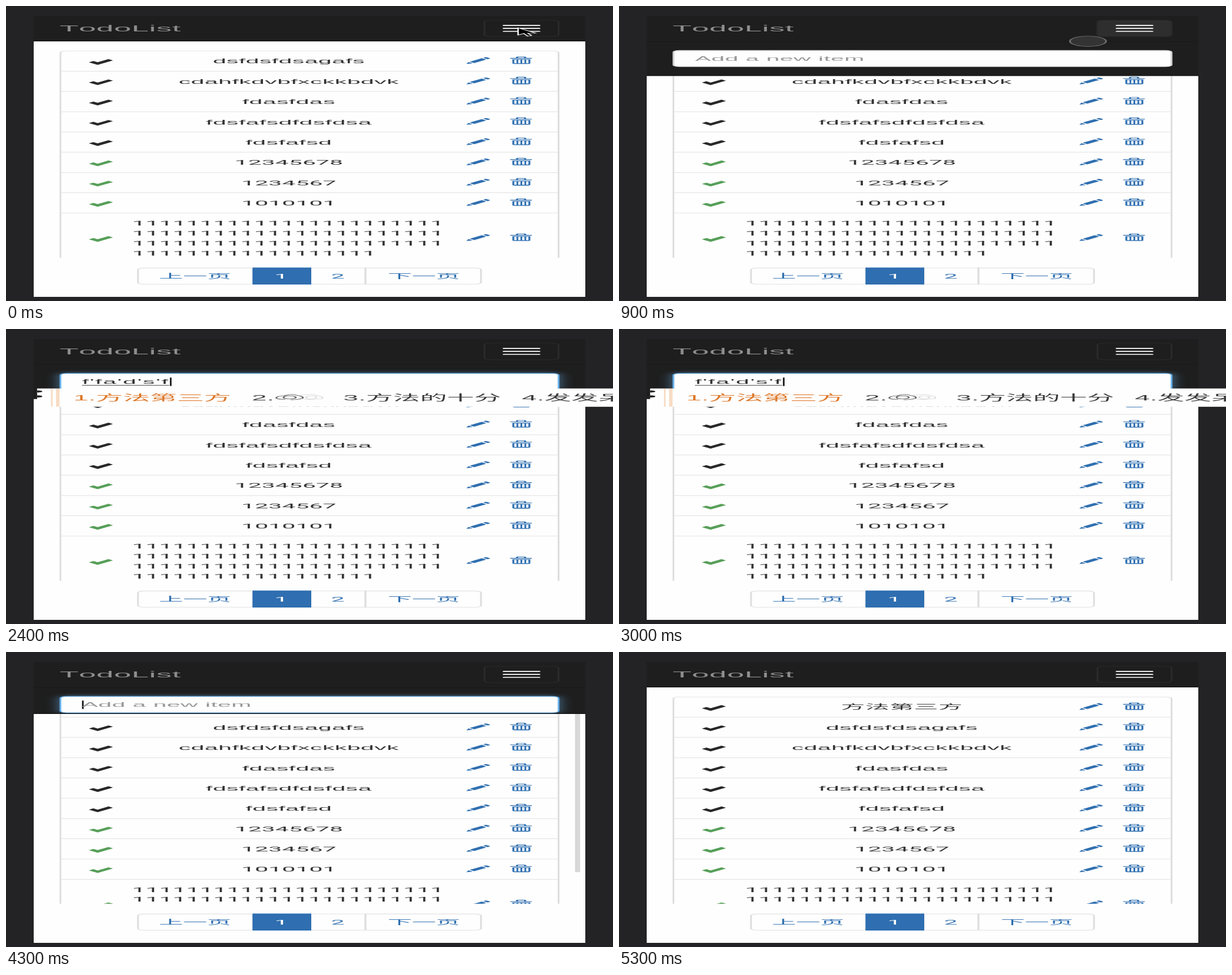
These frames come from a looping animation (1030 by 500 pixels, 5400 ms). An HTML page:

```html
<!DOCTYPE html>
<html lang="zh-CN">
<head>
<meta charset="utf-8">
<title>Todo list</title>
<style>
html, body { margin: 0; width: 100%; height: 100%; overflow: hidden; background: #232224; }
* { box-sizing: border-box; }
#stage { position: fixed; inset: 0; overflow: hidden; contain: strict; }
/* A 320 x 568 phone screen, shown wide and flat */
#phone {
  position: absolute; left: 0; top: 0; width: 320px; height: 568px;
  transform-origin: 0 0; transform: translate(47px, 17px) scale(2.925, .838);
  background: #fefefe; color: #333;
  font: 14px/20px "Liberation Sans", Arial, "Noto Sans CJK SC", "Noto Sans CJK", sans-serif;
  font-kerning: none;
}
#phone div, #phone svg { position: absolute; }
#clip { left: 0; top: 0; width: 320px; height: 489px; overflow: hidden; }
#list { left: 15px; top: 70px; width: 290px; border: 1px solid #ddd; border-radius: 4px; }
#list .row { position: relative; border-top: 1px solid #ddd; }
#list .row.first { border-top: 0; }
.row p {
  margin: 0 0 0 41px; width: 182px; padding: 10px 0;
  text-align: center; word-break: break-all; letter-spacing: .01em;
}
.row.done p, #pages { font-family: Roboto, "Noto Sans CJK SC", "Noto Sans CJK", sans-serif; letter-spacing: 0; }
.row p.long { text-align: left; }
.row svg { top: 50%; overflow: visible; }
.ok { left: 15.6px; margin-top: -5.5px; fill: #282828; }
.done .ok { fill: #579f59; }
.pen { left: 234.9px; margin-top: -8.5px; fill: #2f6fb0; }
.bin { left: 260px; margin-top: -9px; fill: #2f6fb0; }
#bar { left: 314px; top: 2px; width: 2.9px; height: 423px; background: #d8d8d8; }
#pages { left: 0; top: 509px; width: 320px; display: flex; justify-content: center; }
#pages span {
  position: relative; border: 1px solid #ddd; margin-left: -1px; padding: 6px 12px; height: 34px;
  color: #2f6fb0; background: #fefefe;
}
#pages span:first-child { border-radius: 4px 0 0 4px; margin-left: 0; }
#pages span:last-child { border-radius: 0 4px 4px 0; }
#pages .on { z-index: 1; background: #2f6eb0; border-color: #2f6eb0; color: #fff; }
#nav {
  left: 0; top: 0; width: 320px; overflow: hidden;
  background: #1e1e1e; border-bottom: 1px solid #080808;
}
#brand { left: 15px; top: 15px; font-size: 18px; color: #8e8e8e; letter-spacing: .01em; }
#toggle { left: 261px; top: 8px; width: 44px; height: 34px; border: 1px solid #2b2b2b; border-radius: 4px; }
#toggle i { position: absolute; left: 10px; width: 22px; height: 2px; border-radius: 1px; background: #fff; }
#rule { left: 0; top: 51px; width: 320px; height: 1px; background: #181818; }
#glow, #field { left: 15px; top: 69px; width: 290px; height: 34px; border-radius: 4px; }
#glow { background: rgba(102,175,233,.6); filter: blur(4px); }
#field { padding: 6px 12px; white-space: pre; background: #fefefe; border: 1px solid #ccc; color: #555; }
#field.focus { border-color: #66afe9; }
#field .hint { color: #999; letter-spacing: .01em; }
#field u { text-underline-offset: 2px; letter-spacing: .04em; color: #333; }
#caret { display: inline-block; width: 1px; height: 17px; margin-right: -1px; vertical-align: -4px; background: #222; }
#ime {
  left: 1.7px; top: 100.2px; height: 37px; background: #fefefe; overflow: hidden;
  font-size: 15.7px; line-height: 37px; color: #3a3a3a; white-space: nowrap;
}
#ime .notch { left: 0; width: 3.4px; height: 4px; background: #1e1e1e; border-radius: 0 2px 2px 0; }
#ime .stripe { top: 0; height: 37px; }
#words { left: 21.3px; top: 0; height: 37px; display: flex; gap: 12px; overflow: hidden; }
#words b { font-weight: 500; color: #dd7728; }
#words svg { position: static; vertical-align: -1px; }
#arrows { left: 216.7px; top: 8px; fill: none; }
#touch {
  width: 22px; height: 22px; margin: -11px; border-radius: 50%;
  background: rgba(120,120,120,.25); border: 1px solid rgba(150,150,150,.6);
}
#mouse { left: 281.3px; top: 23.5px; overflow: visible; }
</style>
</head>
<body>
<div id="stage">
<div id="phone">
  <div id="clip"><div id="list"></div><div id="bar"></div></div>
  <div id="pages"><span>上一页</span><span class="on">1</span><span>2</span><span>下一页</span></div>
  <div id="nav">
    <div id="brand">TodoList</div>
    <div id="toggle"><i style="top:9px"></i><i style="top:15px"></i><i style="top:21px"></i></div>
    <div id="rule"></div>
    <div id="glow"></div>
    <div id="field"></div>
  </div>
  <div id="ime">
    <div class="notch" style="top:4px"></div>
    <div class="notch" style="top:14px"></div>
    <div class="stripe" style="left:8.2px"></div>
    <div class="stripe" style="left:11.4px"></div>
    <div id="words"></div>
    <svg id="arrows" width="10" height="24"><path d="M.5 6 5 1.5 9.5 6" stroke="#ccc"/><path d="M.5 17 5 21.5 9.5 17" stroke="#dd7728" stroke-width="1.4"/></svg>
  </div>
  <div id="touch"></div>
  <svg id="mouse" width="12" height="18"><path d="M0 0V14.5L3.3 11.4 5.5 16.5 7.8 15.5 5.6 10.6H10.2Z" fill="#000" stroke="#fff" stroke-width=".8"/></svg>
</div>
</div>
<script>
const LOOP = 5400, STEP = 100;
const OPEN = 10, FOCUS = 1200, TYPE = 1600, COMMIT = 3400, ADD = 4200, CLOSE = 4240;
const $ = id => document.getElementById(id);
const show = (id, on) => { $(id).style.display = on ? "" : "none"; };

const icon = (name, d) =>
  `<svg class="${name}" width="14" height="15"><path fill-rule="evenodd" d="${d}"/></svg>`;
const slots = [2.8, 5.1, 7.4, 9.7].map(x => `M${x} 6.6v6.8h1.3v-6.8Z`).join("");
const icons =
  icon("ok", "M0 7.6 2.6 5 5.1 7.5 11.4 1.2 14 3.8 5.1 12.7Z") +
  icon("pen", "M0 14 1.2 10.2 3.8 12.8ZM1.9 9.4 8.9 2.4 11.6 5.1 4.6 12.1ZM9.7 1.6 11 .3H11.7L13.7 2.3V3L12.4 4.3Z") +
  icon("bin", "M3.8 2.8V.8L4.6 0H8.9L9.7.8V2.8H13V4.1H.4V2.8ZM5 2.8H8.5V1.1H5ZM1.7 5.4H12.1V14L11.1 15H2.7L1.7 14Z" + slots);

const NEW_ITEM = "方法第三方";
const todo = ["dsfdsfdsagafs", "cdahfkdvbfxckkbdvk", "fdasfdas", "fdsfafsdfdsfdsa", "fdsfafsd"];
const done = ["12345678", "1234567", "1010101", "1".repeat(87)];

function listHtml(items) {
  return items.concat(done).map((text, i) => {
    const cls = (i ? "" : " first") + (i < items.length ? "" : " done");
    return `<div class="row${cls}"><p class="${text.length > 40 ? "long" : ""}">${text}</p>${icons}</div>`;
  }).join("");
}
const lists = [listHtml(todo), listHtml([NEW_ITEM, ...todo])];

const swirl = `<svg width="28" height="15" fill="none"><g stroke="#666">
  <ellipse cx="8.5" cy="8" rx="3.6" ry="3"/><path d="M6 12Q0 12 .8 8 2 5 5 5 9 0 13 4 17 6 16 10 13 13 9 13"/></g>
  <g stroke="#ddd"><ellipse cx="21" cy="8" rx="3" ry="3"/><path d="M15 4Q22 0 25 5 29 7 27 11 22 13 17 12"/></g></svg>`;

// time, typed letters, candidates
const typing = [
  [1600, "f", ["疯", "符", "父", "峰", "分"]],
  [1800, "f'f", ["方法", "夫妇", "吩咐", "丰富", "付费"]],
  [1900, "f'fa", ["方法", "发发", "分发", "翻法", "放法"]],
  [2000, "f'fa'd", ["方法的", "方法点", "发发的", "分发到"]],
  [2200, "f'fa'd's", ["方法第三", "方法的是", "方法都是", "发发的"]],
  [2300, "f'fa'd's'f", [NEW_ITEM, swirl, "方法的十分", "发发呆"]]
];

// cubic-bezier(.25, .1, .25, 1)
function ease(x) {
  if (x <= 0) return 0;
  if (x >= 1) return 1;
  const bez = (a, b, s) => 3 * a * s * (1 - s) ** 2 + 3 * b * s * s * (1 - s) + s ** 3;
  let lo = 0, hi = 1;
  for (let i = 0; i < 20; i++) {
    const mid = (lo + hi) / 2;
    if (bez(.25, .25, mid) < x) lo = mid; else hi = mid;
  }
  return bez(.1, 1, lo);
}

function drawField(t, step) {
  const focus = t >= FOCUS && t < 4700;
  const blinkOff = t >= 4000 && t < ADD;
  const caret = focus && !blinkOff ? '<span id="caret"></span>' : "";
  let html = caret + '<span class="hint">Add a new item</span>';
  if (step) html = `<u>${step[1]}</u>${caret}`;
  else if (t >= COMMIT && t < ADD) html = NEW_ITEM + caret;
  show("glow", focus);
  $("field").className = focus ? "focus" : "";
  $("field").innerHTML = html;
}

function drawIme(step) {
  show("ime", step);
  if (!step) return;
  const small = step[1].length < 2;
  $("ime").style.width = small ? "242px" : "345px";
  $("words").style.width = small ? "179.5px" : "330px";
  show("arrows", small);
  document.querySelectorAll(".stripe").forEach(el => {
    el.style.width = small ? ".8px" : "1.6px";
    el.style.background = small ? "#eadbd2" : "#f8dcc4";
  });
  $("words").innerHTML = step[2].map((word, i) => {
    const tag = i ? "span" : "b";
    return `<${tag}>${i + 1}.${word}</${tag}>`;
  }).join("");
}

function drawTouch(t) {
  const go = ease((t - 800) / 400);
  show("mouse", t < 100);
  show("touch", t >= 100 && t < 1400);
  $("touch").style.left = 281 - 60 * go + "px";
  $("touch").style.top = 26 + 60 * go + "px";
  $("toggle").style.background = t >= 100 && t < FOCUS ? "#2e2e2e" : "";
}

let last = -1;
function render(t) {
  if (t === last) return;
  const added = t >= ADD;
  if (last < 0 || added !== (last >= ADD)) $("list").innerHTML = lists[+added];
  last = t;

  const open = ease((t - OPEN) / 350) - ease((t - CLOSE) / 350);
  $("nav").style.height = 51.3 + 69.7 * open + "px";
  $("rule").style.opacity = open > 0 ? 1 : 0;
  $("bar").style.opacity = added ? Math.max(0, Math.min(1, (4700 - t) / 300)) : 0;

  const step = t >= TYPE && t < COMMIT ? typing.filter(s => s[0] <= t).pop() : null;
  drawField(t, step);
  drawIme(step);
  drawTouch(t);
}

const start = performance.now();
function tick() {
  const t = (performance.now() - start) % LOOP;
  render(Math.floor(t / STEP) * STEP);
  requestAnimationFrame(tick);
}
tick();
</script>
</body>
</html>
```
